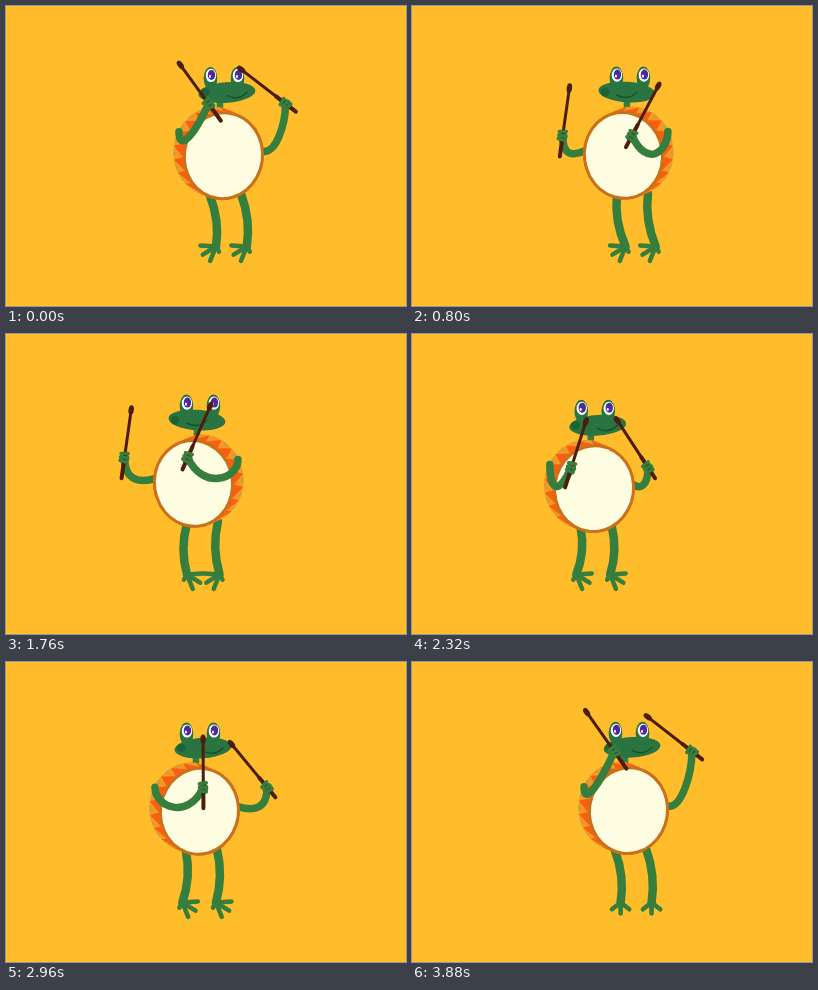
An HTML page with a canvas that plays this animation: 400x300 px, repeating every 3920 ms.

```html
<!DOCTYPE html>
<html lang="en">
<head>
<meta charset="utf-8">
<title>Drumming frog</title>
<style>
  html, body { margin: 0; width: 100%; height: 100%; overflow: hidden; background: #ffbc2b; }
  canvas { display: block; width: 400px; height: 300px; }
</style>
</head>
<body>
<canvas id="stage" width="400" height="300"></canvas>
<script>
const ctx = document.getElementById('stage').getContext('2d');
const LOOP = 3920, HALF = LOOP / 2, STEP = LOOP / 4, BEAT = LOOP / 7;
const TAU = Math.PI * 2, RAD = Math.PI / 180;
const GREEN = '#367e3d', HEAD = '#297441', DARK = '#1d6137', STICK = '#4d1d0c';

const mix = (a, b, k) => a + (b - a) * k;
const clamp = (v, lo, hi) => Math.min(hi, Math.max(lo, v));
const wave = (t, peak, period = LOOP) => Math.cos(TAU * (t - peak) / period);

// Triangle wave with softened corners, for the walk across and back.
const sway = t => Math.asin(.97 * wave(t, 420)) / Math.asin(.97);
// 1 when the body faces right, -1 when it faces left.
const turnAt = t => Math.tanh(6 * (wave(t, 3180) + .127));
const liftAt = t => (.5 + .5 * wave(t, .93 * BEAT, BEAT)) ** 3;

// Feet pivot quickly: 1 points left, 0 to the front, -1 right.
function footFacing(t, pivot) {
  const pointing = change => clamp((change - t) / 40, -1, 1);
  return t < 2800 ? pointing(pivot) : -pointing(3880);
}

function stroke(color, width, trace) {
  ctx.strokeStyle = color;
  ctx.lineWidth = width;
  ctx.beginPath();
  trace();
  ctx.stroke();
}
function line(color, width, x1, y1, x2, y2) {
  stroke(color, width, () => { ctx.moveTo(x1, y1); ctx.lineTo(x2, y2); });
}
function oval(color, x, y, rx, ry, angle = 0) {
  ctx.fillStyle = color;
  ctx.beginPath();
  ctx.ellipse(x, y, rx, ry, angle, 0, TAU);
  ctx.fill();
}
function polygon(color, points) {
  ctx.fillStyle = color;
  ctx.beginPath();
  points.forEach(p => ctx.lineTo(...p));
  ctx.fill();
}

function drawLeg(hipX, hipY, ankleX, ankleY, bend, facing) {
  stroke(GREEN, 8.5, () => {
    ctx.moveTo(hipX, hipY);
    ctx.quadraticCurveTo((hipX + ankleX) / 2 + bend, (hipY + ankleY) / 2, ankleX, ankleY);
  });
  const side = Math.abs(facing), spread = mix(52, 36, side), length = mix(11, 15.5, side);
  const toe = (degrees, reach) => line(GREEN, 4.5, ankleX, ankleY,
    ankleX - reach * Math.sin(degrees * RAD), ankleY + reach * Math.cos(degrees * RAD));
  for (let i = -1; i <= 1; i++) toe(58 * facing + i * spread, length);
  toe(-30 * facing, 6);
}

// Joints of one arm relative to the body; "out" is 1 when held away from the drum.
function armPose(t, side, out) {
  const lift = liftAt(t);
  const outX = 68 + 11 * wave(t, 1400, HALF);
  const drumX = 20 * wave(t, 440, HALF) - 3 + 13 * lift;
  const x = side * mix(drumX, outX, out);
  const y = -17 + 8 * wave(t, 200, HALF) - 48 * lift;
  const shoulderX = side * 41, shoulderY = mix(-24, -5, out);
  return {
    shoulder: [shoulderX, shoulderY],
    elbow: [mix(shoulderX, x * .85, out), shoulderY + mix(20, 6, out)],
    wrist: [x + side * 15 * (1 - out), y + mix(33, 20, out)],
    hand: [x, y]
  };
}

function drawArm({ shoulder, elbow, wrist, hand }) {
  stroke(GREEN, 7.5, () => {
    ctx.moveTo(...shoulder);
    ctx.bezierCurveTo(...elbow, ...wrist, ...hand);
  });
}

function drawStick([x, y], angle, grip) {
  ctx.save();
  ctx.translate(x, y);
  ctx.rotate(angle * RAD);
  oval(GREEN, 0, 1, 5, 6);
  line(STICK, 4, 0, grip - 1, 0, grip - 26);
  line(STICK, 3, 0, grip - 20, 0, grip - 71);
  oval(STICK, 0, grip - 70, 2.7, 4.8);
  for (let i = -1; i <= 1; i++) line(GREEN, 3.5, -4, i * 3.5, 3, i * 4.5);
  ctx.restore();
}

function drawDrum(x, turn) {
  const rx = 45 - 4.5 * turn * turn, ry = 44.5, dx = -10 * turn, dy = -3;
  const count = 20, step = TAU / count;
  const edge = (a, depth) => [rx * Math.cos(a) + dx * depth, ry * Math.sin(a) + dy * depth];
  ctx.save();
  ctx.translate(x, 0);
  ctx.rotate(turn * 8 * RAD);
  oval('#f29a24', dx, dy, rx, ry);
  for (let a = 0; a < TAU; a += step) {
    polygon('#fc5d10', [edge(a - step / 2, 0), edge(a + step / 2, 0), edge(a, 1)]);
    polygon('#c39d55', [edge(a + step * .25, 1), edge(a + step * .75, 1), edge(a + step / 2, .7)]);
  }
  oval('#c9701b', 0, 0, rx, ry);
  oval('#fffde1', 0, 0, rx - 3, ry - 3);
  ctx.restore();
}

function drawHead(x, y, turn) {
  oval(HEAD, x, y, 28.5, 10.3, -turn * 4 * RAD);
  for (const side of [-1, 1]) {
    const eyeX = x - 3 * turn + side * 13.5;
    oval(HEAD, eyeX, y - 14, 6.8, 11.5);
    oval('#fff', eyeX + .5, y - 17, 5.2, 6.6);
    oval('#4d2a9c', eyeX + 1, y - 17.5, 3.7, 5);
    oval('#fff', eyeX - .5, y - 16, 1, 1.6);
  }
  oval(DARK, x - 22, y, 4.3, 4.3);
  const mouth = x - 5 + 5 * turn;
  stroke('#174d27', 1.3, () => {
    ctx.moveTo(mouth, y + 3);
    ctx.quadraticCurveTo(mouth + 11, y + 9, mouth + 20, y);
  });
}

function draw(t) {
  const turn = turnAt(t);
  const x = 200 + 21.5 * sway(t);
  const y = 151.5 + 4 * wave(t, .27 * STEP, STEP) + 2.5 * wave(t, 1300);
  const leftOut = clamp(.5 - 1.2 * turn, 0, 1), rightOut = 1 - leftOut;
  const left = armPose(t, -1, leftOut), right = armPose(t, 1, rightOut);
  const drift = wave(t, 2200);
  const leftAngle = mix(-10 + 28 * drift, 8, leftOut);
  const rightAngle = mix(25 + 22 * wave(t, 1250, HALF), -43 + 10 * drift, rightOut);
  const stride = wave(t, 600);

  ctx.fillStyle = '#ffbc2b';
  ctx.fillRect(0, 0, 400, 300);
  ctx.lineCap = ctx.lineJoin = 'round';
  drawLeg(x - 10, y + 40, x - 8 + 7 * stride, 240.5, 7 * turn, footFacing(t, 1720));
  drawLeg(x + 21, y + 38, x + 24 + 5 * stride, 240.5, 7 * turn, footFacing(t, 1800));

  ctx.save();
  ctx.translate(x, y);
  line(GREEN, 6.5, 0, -62, 0, -38);
  drawArm(turn < 0 ? left : right);
  drawDrum(3.5 * turn, turn);
  drawHead(3.5 + 3.5 * turn, -63.3, turn);
  drawArm(turn < 0 ? right : left);
  drawStick(left.hand, leftAngle, 22);
  drawStick(right.hand, rightAngle, 14);
  ctx.restore();
}

const start = performance.now();
function frame() {
  const t = (performance.now() - start) % LOOP;
  draw(Math.floor(t / 40) * 40);
  requestAnimationFrame(frame);
}
frame();
</script>
</body>
</html>
```
